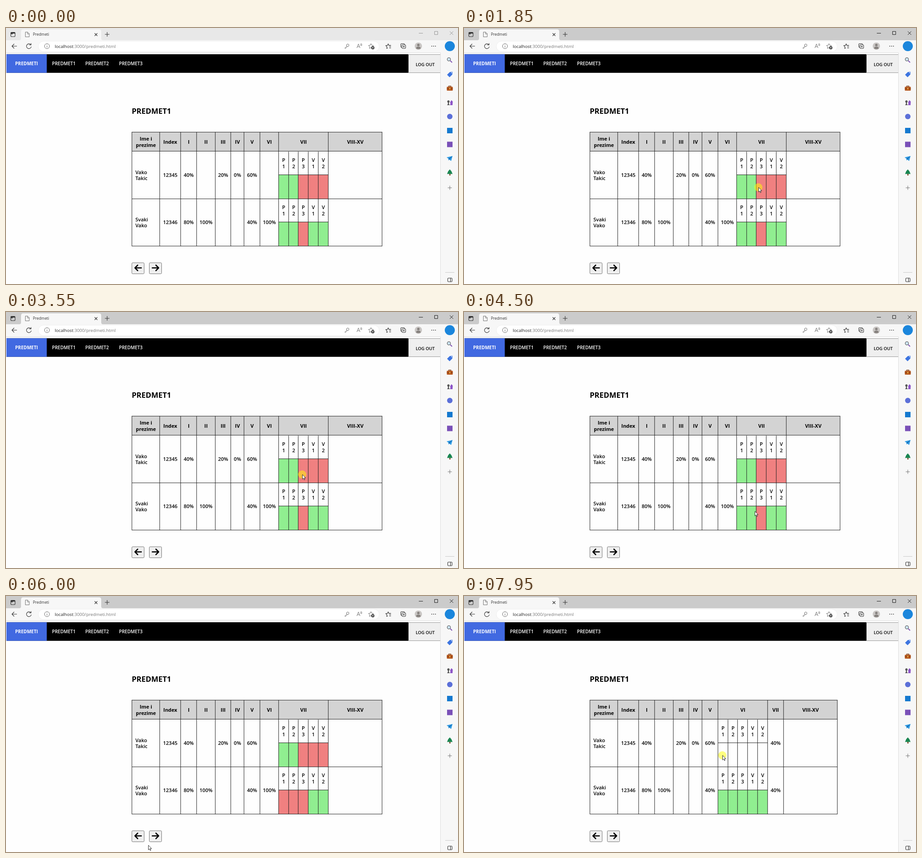
Animation, 992 px wide and 564 px high, one loop 8 s. Source, as an HTML page:

```html
<!DOCTYPE html>
<html lang="bs">
<head>
<meta charset="utf-8">
<title>Predmeti</title>
<style>
html, body { margin: 0; width: 100%; height: 100%; overflow: hidden; background: #fefefe; }
svg { display: block; width: 992px; height: 564px; font: 600 11px "Open Sans", "Noto Sans", sans-serif; }
.line { fill: none; stroke: #333; stroke-width: 1.1; }
.thin { stroke: #666; stroke-width: .9; }
.nav { font-size: 10px; }
.ui { font-weight: 400; }
.mid { text-anchor: middle; }
.head { font-weight: 700; }
.grid { fill: none; stroke: #222; }
.button { fill: #efefef; stroke: #767676; }
.button.hover { fill: #e5e5e5; stroke: #4f4f4f; }
.arrow { fill: none; stroke: #000; stroke-width: 2.5; stroke-linecap: round; stroke-linejoin: round; }
</style>
</head>
<body>
<svg viewBox="0 0 992 564">
  <rect width="992" height="564" fill="#fefefe"/>

  <!-- Title bar -->
  <rect id="titlebar" width="992" height="28"/>
  <path d="M29 27q4 0 4-4V8q0-5 5-5h166q5 0 5 5v15q0 4 4 4z" fill="#f7f7f7"/>
  <g class="line">
    <rect x="10.5" y="9.5" width="9.5" height="9.5" rx="2"/>
    <path d="M10.5 11h9.5M13 11v3" stroke-width="2.6"/>
    <path d="M42.5 9h5l3.5 3.5v7h-8.5zM47 9v4h4" class="thin"/>
    <path d="M194.5 11.5l6 6m0-6l-6 6M217 14h10m-5-5v10"/>
  </g>
  <text class="ui" x="59" y="17" font-size="8.4" fill="#333">Predmeti</text>
  <path id="windowButtons" fill="none" d="M906 11.5h9M940.5 7.5h7v7h-7zM974 7.5l7.5 7.5m0-7.5l-7.5 7.5"/>

  <!-- Toolbar -->
  <rect y="27" width="992" height="27" fill="#f7f7f7"/>
  <rect x="953" y="54" width="39" height="510" fill="#f7f7f7"/>
  <path d="M0 54.5h953.5V564" fill="none" stroke="#dedede"/>
  <rect x="71" y="29" width="748" height="23" rx="11.5" fill="#fff" stroke="#e6e6e6" stroke-width=".6"/>
  <g class="line">
    <path d="M24 40H13m5-5l-5 5 5 5"/>
    <path d="M54.5 37A5.3 5.3 0 1 0 55.5 41M55 33.5V37.3h-4"/>
    <g class="thin">
      <circle cx="90" cy="40" r="5.5"/><path d="M90 39v4M90 36.5v1"/>
      <circle cx="750" cy="38" r="2.7"/><path d="M748 40l-4.5 4.5h2.5l3-3"/>
      <path d="M770 44l3.5-9 3.5 9m-5.7-3h4.5M777.5 35q2 1.5 1 4M779 33.5q3 2 1.5 6"/>
      <path d="M801 34.5l1.7 3.5 3.8.5-2.8 2.7.7 3.8-3.4-1.8-3.4 1.8.7-3.8-2.8-2.7 3.8-.5z"/>
    </g>
    <circle cx="805" cy="43.5" r="3" fill="#555"/><path d="M803.5 43.5h3m-1.5-1.5v3" stroke="#fff" stroke-width=".8"/>
    <path d="M838 44l-2.5 1 .6-3.6-2.6-2.5 3.6-.5 1.7-3.4 1.6 3.4H845M841 41h4M841 44h4"/>
    <rect x="866.5" y="34.5" width="8" height="8" rx="1.5"/>
    <rect x="869" y="37" width="8" height="8" rx="1.5" fill="#f7f7f7"/><path d="M873 39v4m-2-2h4"/>
  </g>
  <circle cx="905" cy="40" r="8" fill="#c9c6c4"/>
  <path d="M900 45q0-4 5-4t5 4q-5 3-10 0z" fill="#85807d"/><circle cx="905" cy="37.5" r="2.7" fill="#85807d"/>
  <path d="M934.5 40h9" stroke="#333" stroke-width="1.8" stroke-linecap="round" stroke-dasharray="0 4"/>
  <text class="ui" x="107" y="43.5" font-size="9.7" fill="#222">localhost<tspan fill="#777">:3000/predmeti.html</tspan></text>

  <!-- Sidebar -->
  <circle cx="974" cy="40" r="11" fill="#1b86dc"/>
  <circle cx="972" cy="69" r="3.6" fill="#cfe8fa" stroke="#666" stroke-width="1.3"/>
  <path d="M975 72l4 4" stroke="#8054b5" stroke-width="2"/>
  <path d="M968 103l6-6 6-.5-.5 6-6 6z" fill="#3c74e0"/><circle cx="978" cy="98.5" r="1" fill="#fff"/>
  <path d="M971.5 130v-2h5v2" fill="none" stroke="#7b3d13" stroke-width="1.3"/>
  <rect x="967.5" y="129.5" width="13" height="8.5" rx="1" fill="#b4541a"/>
  <path d="M967.5 133.5h13" stroke="#713411"/><rect x="972.5" y="132.5" width="3" height="2.5" fill="#f2b84b"/>
  <path d="M968 170q3-3 1.5-6a2.5 2.5 0 1 1 3 0q-1.5 3 1.5 6z" fill="#555"/>
  <path d="M974.5 170l1-4-1-2 3-5 3 3-.5 8z" fill="#8d55c7"/>
  <circle cx="974" cy="195" r="6" fill="#5b6fd8"/>
  <rect x="968" y="220" width="12" height="12" fill="#1579cf"/>
  <rect x="968" y="250.5" width="12" height="12" fill="#7a50b8"/>
  <path d="M967 285l13-3-3 11-4-3-2 2v-4z" fill="#2f9be4"/><path d="M971 288l9-6-7 8z" fill="#1769b0"/>
  <path d="M973 320h2.5v5H973z" fill="#7a4a2a"/>
  <path d="M974 311.5l3.5 4 2.5 6h-12l2.5-6z" fill="#188550"/>
  <g class="line">
    <path d="M969.5 352h9m-4.5-4.5v9" class="thin"/>
    <path d="M964 538.5h20" stroke="#ccc"/>
    <rect x="969.5" y="551" width="9.5" height="8" rx="1.5"/><path d="M975.5 551v8"/>
  </g>

  <!-- Page -->
  <g class="nav">
    <path d="M1 57.7h882v41H1z"/>
    <path d="M1 57.7h88.5v41H1z" fill="#4169e1"/>
    <path d="M953 58.5h-69.5v40H953" fill="#efefef" stroke="#999"/>
    <g fill="#fff">
      <text class="head" x="20" y="82">PREDMETI</text>
      <text x="101" y="82">PREDMET1</text><text x="174" y="82">PREDMET2</text><text x="248" y="82">PREDMET3</text>
    </g>
    <text class="mid" x="920" y="84" font-size="9.5">LOG OUT</text>
  </g>
  <text class="head" x="276" y="189" font-size="16.5">PREDMET1</text>
  <g id="weekSeven"></g>
  <g id="weekSix"></g>
  <rect id="previous" class="button" x="276.2" y="517.2" width="27" height="24.3" rx="2"/>
  <rect class="button" x="314.5" y="517.2" width="27" height="24.3" rx="2"/>
  <path class="arrow" d="M297 528.5H283m6-6l-6 6 6 6M321 528.5h14m-6-6l6 6-6 6"/>

  <g id="cursor">
    <circle id="click" r="9" fill="#ff0" fill-opacity=".5"/>
    <path d="M.5 0v10.3l2.3-2.2 1.7 3.7 1.5-.7-1.6-3.5h3.2z" fill="#fff" stroke="#222" stroke-width=".9"/>
  </g>
</svg>
<script>
const el = id => document.getElementById(id);
const GREEN = '#90ee90', RED = '#f08080', WHITE = '#fefefe';
const STUDENTS = [['Vako', 'Takic', '12345'], ['Svaki', 'Vako', '12346']];
const ATTENDANCE = ['P1', 'P2', 'P3', 'V1', 'V2'];
const WEEKS = ['I', 'II', 'III', 'IV', 'V', 'VI', 'VII'];
const WEEK_WIDTHS = [35, 41, 34, 29, 35, 41, 35];
const TABLE_LEFT = 276, OPEN_WIDTH = 109, SUB_WIDTH = 21.7, ROW_HEIGHT = 104;

const text = (x, y, s, cls = 'mid') => `<text x="${x}" y="${y}" class="${cls}">${s}</text>`;

// The open week is expanded into attendance cells; the others show grades
function buildTable(id, openWeek, grades, fill) {
  const open = openWeek + 1;
  const widths = [61, 46, ...WEEK_WIDTHS.map((w, i) => i === openWeek - 1 ? OPEN_WIDTH : w), 118];
  const edges = [TABLE_LEFT];
  for (const w of widths) edges.push(edges.at(-1) + w);
  const right = edges.at(-1), left = edges[open];
  const centre = i => (edges[i] + edges[i + 1] + 1) / 2;
  const subX = k => Math.round(left + k * SUB_WIDTH);
  const across = (x, y, end) => `M${x} ${y}H${end}`;
  const down = (x, y, end) => `M${x} ${y}V${end}`;

  let lines = [229, 271, 376, 480].map(y => across(TABLE_LEFT, y, right)).join('');
  lines += edges.map(x => down(x, 228.5, 480.5)).join('');
  let out = `<rect x="${TABLE_LEFT}" y="229" width="${right - TABLE_LEFT}" height="42" fill="#d3d3d3"/>`;
  out += text(307, 248, 'Ime i', 'mid head') + text(307, 261.5, 'prezime', 'mid head');
  ['Index', ...WEEKS, 'VIII-XV'].forEach((s, i) => out += text(centre(i + 1), 255, s, 'mid head'));

  STUDENTS.forEach(([first, last, index], r) => {
    const offset = r * ROW_HEIGHT, base = 328 + offset, half = 323 + offset;
    out += text(284, base - 6.5, first, '') + text(284, base + 7, last, '') + text(centre(1), base, index);
    grades[r].forEach((s, i) => out += text(centre(i + 2), base, s));
    lines += across(left, half, edges[open + 1]);
    ATTENDANCE.forEach(([letter, digit], k) => {
      const x = subX(k);
      out += `<rect class="cell" fill="${fill[r]}" x="${x}" y="${half}" width="${subX(k + 1) - x}" height="53"/>`;
      out += text(x + 11.3, base - 33, letter) + text(x + 11.3, base - 19.5, digit);
      if (k) lines += down(x, 272 + offset, 376 + offset);
    });
  });
  el(id).innerHTML = out + `<path class="grid" transform="translate(.3 .4)" d="${lines}"/>`;
  return { left, cells: el(id).querySelectorAll('.cell') };
}

const grades = [['40%', '', '20%', '0%', '60%', ''], ['80%', '100%', '', '', '40%']];
const { left: openLeft, cells } =
  buildTable('weekSeven', 7, [grades[0], [...grades[1], '100%']], [RED, RED]);
buildTable('weekSix', 6, [[...grades[0], '40%'], [...grades[1], '', '40%']], [WHITE, GREEN]);

const LOOP = 8000, STEP = 50, HOLD = 150, REACTION = 100;
const stop = (time, x, y) => ({ time, x, y, leave: time });
const click = (time, x, y) => ({ time, x, y, leave: time + HOLD, pressed: true });
const stops = [
  stop(850, 979, 556), stop(1150, 716, 212), stop(1300, 694, 284),
  click(1800, 646, 351), click(2200, 673, 356), click(2550, 694, 358),
  click(2950, 694, 358), click(3200, 672, 358), click(3450, 650, 358),
  stop(3700, 643, 426), stop(3850, 641, 402), stop(4200, 632, 475), stop(4500, 638, 439),
  click(4600, 635, 447), click(5200, 615, 450), stop(6000, 312, 549),
  click(6350, 288, 529), stop(7300, 288, 529), click(7900, 567, 351)
];
const clicks = stops.filter(s => s.pressed);
const onPrevious = ({ x, y }) => x > 276 && x < 304 && y > 517 && y < 542;

function cellAt({ x, y }) {
  const column = Math.floor((x - openLeft) / SUB_WIDTH), row = y < 376 ? 0 : 1;
  return column < 0 || column > 4 || y > 480 ? -1 : row * 5 + column;
}

function cursorAt(t) {
  const next = stops.findIndex(s => s.time > t);
  if (next < 1) return next ? stops.at(-1) : stops[0];
  const a = stops[next - 1], b = stops[next];
  const u = Math.max(0, (t - a.leave) / (b.time - a.leave)), e = u * u * (3 - 2 * u);
  return { x: a.x + (b.x - a.x) * e, y: a.y + (b.y - a.y) * e };
}

const show = (id, on) => el(id).setAttribute('visibility', on ? 'visible' : 'hidden');

function render(now) {
  const t = Math.floor(now % LOOP / STEP) * STEP;
  const focused = t >= clicks[0].time;
  const handled = clicks.filter(c => t >= c.time + REACTION);
  const switched = handled.some(onPrevious);
  el('titlebar').setAttribute('fill', focused ? '#cbcbcb' : '#e8e8e8');
  el('windowButtons').setAttribute('stroke', focused ? '#222' : '#999');
  show('weekSeven', !switched);
  show('weekSix', switched);

  // Each click on a cell flips it
  const present = [true, true, false, false, false, true, true, false, true, true];
  for (const c of handled) present[cellAt(c)] = !present[cellAt(c)];
  cells.forEach((cell, i) => cell.setAttribute('fill', present[i] ? GREEN : RED));

  const cursor = cursorAt(t);
  el('previous').classList.toggle('hover', onPrevious(cursor));
  el('cursor').setAttribute('transform', `translate(${cursor.x} ${cursor.y})`);
  show('cursor', t >= stops[0].time);
  show('click', clicks.some(c => t >= c.time && t < c.leave));
  requestAnimationFrame(render);
}
requestAnimationFrame(render);
</script>
</body>
</html>
```
